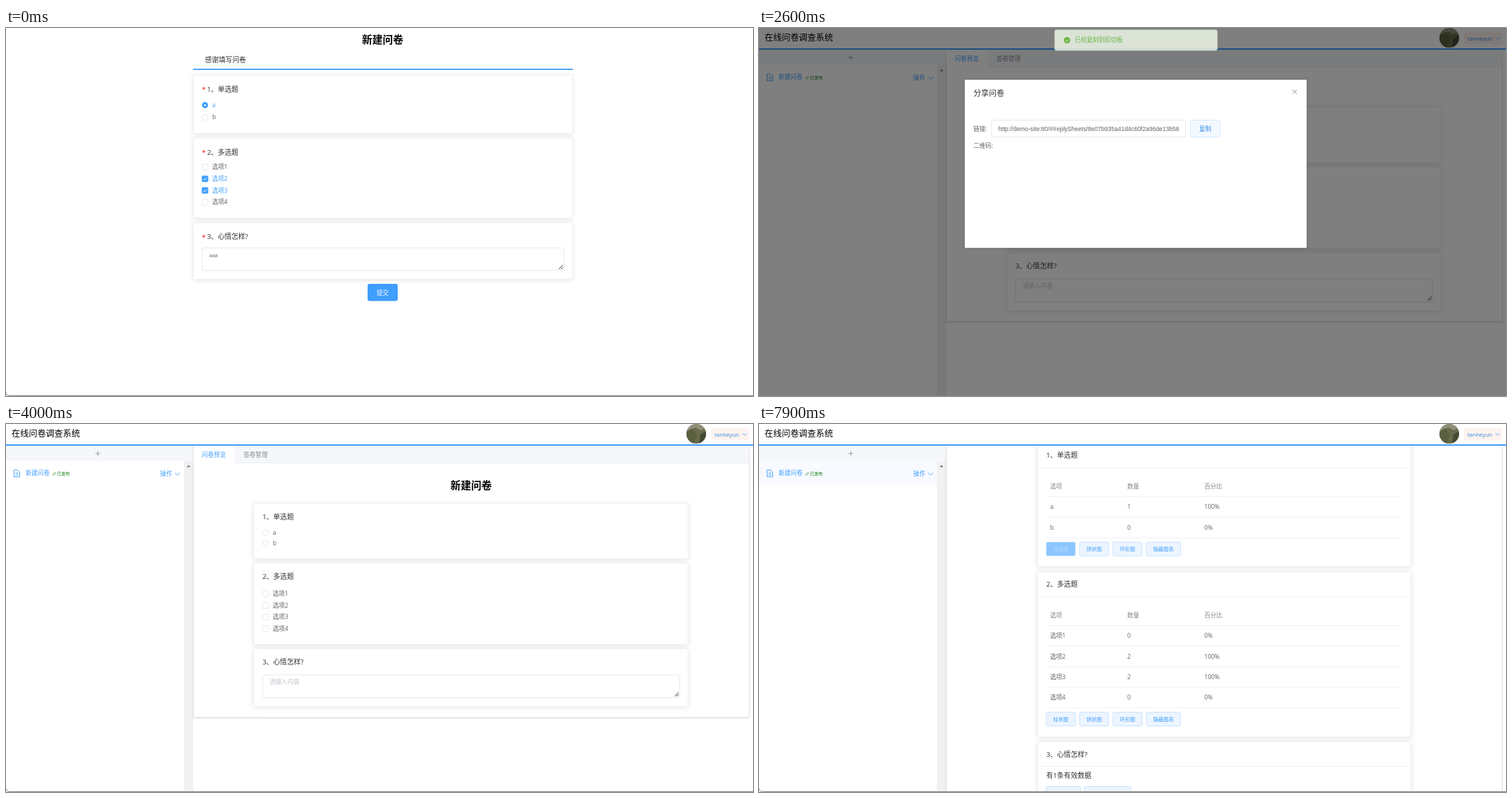
Animation of 1066x525 px, one loop 8000 ms. Source, as an HTML page:

```html
<!DOCTYPE html>
<html lang="zh-CN">
<head>
<meta charset="utf-8">
<title>问卷</title>
<style>
html, body { margin: 0; width: 100%; height: 100%; overflow: hidden; background: #fff; }
svg { display: block; }
text { font-family: 'Open Sans', 'Noto Sans CJK SC', 'Noto Sans CJK', sans-serif; white-space: pre; }
.card { filter: drop-shadow(0 1.2px 3.6px rgba(0,0,0,.11)); }
.panel { filter: drop-shadow(0 1.2px 1.2px rgba(0,0,0,.14)); }
.dialog { filter: drop-shadow(0 .6px 1.5px rgba(0,0,0,.35)); }
#url { font-family: 'Liberation Sans', Arial, sans-serif; }
</style>
</head>
<body>
<svg id="stage" width="1066" height="525" viewBox="0 0 1066 525"></svg>
<script>
const BLUE = '#409eff', DEEP = '#2f86dc', GREY = '#606266', DARK = '#303133', PALE = '#84878d',
  LINE = '#dcdfe6', GREEN = '#67c23a';
const SMALL = 8.55, MEDIUM = 9.78, LARGE = 14.7;

// Shape helpers; text is placed by the vertical centre of its glyphs.
const rect = (x, y, w, h, fill, more = '') =>
  `<rect x="${x}" y="${y}" width="${w}" height="${h}" fill="${fill}" ${more}/>`;
const text = (x, y, s, size = SMALL, fill = GREY, more = '') =>
  `<text x="${x}" y="${y + size * .37}" font-size="${size}" fill="${fill}" ${more}>${s}</text>`;
const middle = (x, y, s, size, fill, more = '') =>
  text(x, y, s, size, fill, `text-anchor="middle" ${more}`);
const bold = (x, y, s, fill = '#000') => middle(x, y, s, LARGE, fill, 'font-weight="700"');
const path = (d, stroke, w = .8, more = '') =>
  `<path d="${d}" fill="none" stroke="${stroke}" stroke-width="${w}" ${more}/>`;
const disc = (x, y, r, fill, more = '') => `<circle cx="${x}" cy="${y}" r="${r}" fill="${fill}" ${more}/>`;
const group = (id, body, more = '') => `<g id="${id}" ${more}>${body}</g>`;
const edge = (color, r = 2.4) => `rx="${r}" stroke="${color}" stroke-width=".7"`;
const card = (x, y, w, h) => rect(x, y, w, h, '#fff', edge('#ebeef5') + ' class="card"');
const chevron = (x, y, w) => path(`M${x} ${y}l${w / 2} ${w / 2.2}l${w / 2} ${-w / 2.2}`, BLUE, .8);
const tick = (x, y, s) => path(`M${x - s} ${y}l${s * .8} ${s * .8}l${s * 1.3} ${-s * 1.5}`, '#fff', .9);

const radio = (x, y, label, on) =>
  (on ? disc(x, y, 4.4, BLUE) + disc(x, y, 1.3, '#fff')
      : disc(x, y, 4.1, '#fff', `stroke="${LINE}" stroke-width=".7"`)) +
  text(x + 10.2, y - .4, label, SMALL, on ? BLUE : GREY);
const checkbox = (x, y, label, on) =>
  rect(x - 4.2, y - 4.2, 8.4, 8.4, on ? BLUE : '#fff', edge(on ? BLUE : LINE, 1.2)) +
  (on ? tick(x, y, 2.3) : '') + text(x + 10.2, y - .2, label, SMALL, on ? BLUE : GREY);
const textarea = (x, y, w, h) => rect(x, y, w, h, '#fff', edge(LINE)) +
  path(`M${x + w - 7} ${y + h - 2}l5.5 -5.5M${x + w - 4} ${y + h - 2}l2.5 -2.5`, '#333', 1);
const button = (x, y, w, label, id = '') => group(id,
  rect(x, y, w, 19.5, '#ecf5ff', edge('#b3d8ff', 1.8)) + middle(x + w / 2, y + 9.7, label, 7.33, BLUE));
const question = (x, y, s) => text(x, y, s, MEDIUM, DARK);
const required = (x, y, s) => text(x, y + .4, '*', MEDIUM, '#f00') + question(x + 7.4, y, s);
const options = (x, y, chosen) => [1, 2, 3, 4].map((n, i) =>
  checkbox(x, y + i * 16.6, '选项' + n, chosen.includes(n))).join('');

const form = rect(0, 0, 1066, 525, '#fff') + bold(537.5, 17, '新建问卷') +
  text(284, 45, '感谢填写问卷', MEDIUM, DARK) + rect(267, 58, 542, 1.8, BLUE) +
  card(267.2, 67.5, 541, 83) + required(279.5, 87, '1、单选题') +
  radio(284, 110, 'a', true) + radio(284, 127.5, 'b') +
  card(267.2, 157, 541, 114) + required(279.5, 177, '2、多选题') + options(284, 198.5, [2, 3]) +
  card(267.2, 278, 541, 80.5) + required(279.5, 297.5, '3、心情怎样?') +
  textarea(280, 313.8, 516, 32.2) + text(290, 324, 'aaa', 7.3) +
  rect(516, 365, 43, 24.5, BLUE, 'id="submit" rx="2.4"') + middle(537.5, 377.4, '提交', SMALL, '#fff');

const loading = rect(0, 0, 1066, 525, '#fff', 'id="veil"') +
  path('M533 250.3a12.2 12.2 0 1 1 -12.2 12.2', BLUE, 1.2, 'id="spinner" stroke-linecap="round"');

const done = rect(0, 0, 1066, 525, '#fff') + card(263.5, 7, 536, 175.5) +
  disc(531.7, 75, 48.8, '#35b36f') +
  '<path d="M507 77.5L512 72.5L525 82L557 57L560 60.5L524 95.5Z" fill="#fff"/>' +
  bold(531.2, 149, '填写问卷成功', DARK);

const message = (id, x, s) => group(id, rect(x, 0, 232, 29.3, '#f0f9eb', edge('#e1f3d8')) +
  disc(x + 17.6, 14.8, 4.5, GREEN) + tick(x + 17.6, 15, 2.1) + text(x + 28.6, 14.6, s, SMALL, GREEN));

const avatar = '<clipPath id="round"><circle cx="985" cy="14" r="14"/></clipPath><g clip-path="url(#round)">' +
  rect(971, 0, 28, 28, '#6a6a4c') + '<path d="M971 0h28v5l-8 4l-7 -4l-13 5z" fill="#8f8f7a"/>' +
  '<path d="M971 12l8 -6l7 9l-4 13h-11z" fill="#59603f"/><path d="M999 10l-8 5l-2 13h10z" fill="#454a34"/></g>';

const sidebar = rect(0, 31, 267, 21.5, '#f5f7fa') + path('M127.5 42h7M131 38.5v7', PALE, .8) +
  rect(0, 52.5, 254, 34, '#fff', 'id="row"') +
  path('M11.5 65.7h5l3 3v6.6h-8zM13.5 70h4M13.5 72.5h4', BLUE, .9) +
  text(28, 70.3, '新建问卷', SMALL, BLUE) +
  path('M66 73l3 -3.5a1 1 0 0 1 1.5 1.3l-2.8 2.8', '#3a8a3a', .7) +
  text(72.8, 71.2, '已发布', 6.1, '#0a7a0a') +
  text(220, 70.6, '操作', SMALL, BLUE) + chevron(241, 69.7, 7.5) +
  rect(254, 52.5, 13, 472, '#f1f1f1') + '<path d="M257.8 61.5l2.7 -3l2.7 3z" fill="#777"/>';

const header = rect(0, 0, 1066, 30, '#fff') + text(8, 13.6, '在线问卷调查系统', 12.22, '#000') + avatar +
  rect(1006, 6, 54, 17, '#fdf3f0', 'rx="2.4"') +
  text(1011, 14.6, 'tanheyun', 8, DEEP) + chevron(1051, 13.5, 6) + rect(0, 29, 1066, 2, BLUE);

const tabs = (active, height) =>
  rect(267.4, 31, 793, height, '#fff', `stroke="${LINE}" stroke-width=".7" class="panel"`) +
  rect(267.4, 31, 793, 24.5, '#f5f7fa', 'stroke="#e4e7ed" stroke-width=".7"') +
  rect(active ? 327 : 267.7, 31, 59, 25, '#fff') +
  text(279.5, 43.8, '问卷预览', SMALL, active ? PALE : BLUE) +
  text(339, 43.8, '答卷管理', SMALL, active ? BLUE : PALE, active ? '' : 'id="tab"');

const preview = tabs(0, 387.5) + bold(663.7, 87.3, '新建问卷') +
  card(353.7, 113, 619.5, 79.3) + question(366, 132.6, '1、单选题') +
  radio(370.5, 155.3, 'a') + radio(370.5, 169.9, 'b') +
  card(353.7, 198.5, 619.5, 116) + question(366, 217.5, '2、多选题') + options(370.5, 242.2, []) +
  card(353.7, 320.7, 619.5, 82.3) + question(366, 339.5, '3、心情怎样?') +
  textarea(366.2, 358, 595, 32.5) + text(376, 367.8, '请输入内容', SMALL, '#c0c4cc');

const rule = (y, x = 410, w = 507.5) => rect(x, y - .4, w, .8, '#ebeef5');
function statCard(y, title, rows, id) {
  const cells = (cy, values, fill) => values.map((v, i) => text(415.5 + i * 110, cy, v, SMALL, fill)).join('');
  const end = y + 77 + rows.length * 29.3;
  return card(397.7, y, 532.5, end + 41 - y) + question(410, y + 17.7, title) + rule(y + 35.2, 398, 532) +
    cells(y + 62, ['选项', '数量', '百分比'], PALE) + rule(y + 76.7) +
    rows.map((r, i) => cells(y + 91.2 + i * 29.3, r, GREY) + rule(y + 106 + i * 29.3)).join('') +
    ['柱状图', '饼状图', '环形图', '隐藏图表'].map((s, i) =>
      button(410 + i * 47.6, end + 6, i < 3 ? 41.3 : 48.8, s, i ? '' : id)).join('');
}
const stats = tabs(1, 700) + button(398, 77, 51, '导出数据') +
  statCard(104, '1、单选题', [['a', 1, '100%'], ['b', 0, '0%']], 'bar') +
  statCard(288, '2、多选题', [['选项1', 0, '0%'], ['选项2', 2, '100%'], ['选项3', 2, '100%'], ['选项4', 0, '0%']], 'bar2') +
  card(397.7, 530.3, 532.5, 140) + question(410, 548, '3、心情怎样?') + rule(565.5, 398, 532) +
  question(410, 578.6, '有1条有效数据') + button(410, 594.3, 48.8, '查看详情') + button(464.5, 594.3, 66.5, '显示全部内容');

const dialog = rect(293.6, 73.8, 488, 240, '#fff', 'rx="1.2" class="dialog"') +
  text(306, 93.4, '分享问卷', 11, DARK) + path('M761.5 88l6 6m0 -6l-6 6', PALE, .9, 'id="close"') +
  text(306, 143.4, '链接:') + rect(332, 131.5, 277, 24, '#fff', edge(LINE)) +
  '<clipPath id="field"><rect x="340" y="132" width="260" height="23"/></clipPath><g clip-path="url(#field)">' +
  text(341.5, 143.4, 'http://demo-site:80/#/replySheets/8e07b935a41d4c60f2a96de13b58', SMALL, GREY, 'id="url"') + '</g>' +
  rect(615.5, 131.5, 42.5, 24, '#f3f9ff', edge('#c6e2ff') + ' id="copy"') +
  middle(636.8, 143.4, '复制', SMALL, DEEP, 'id="copyLabel"') + text(306, 167.9, '二维码:');

const stage = document.getElementById('stage');
stage.innerHTML = group('form', form) + group('loading', loading) + group('done', done) +
  message('saved', 415.5, '回答问卷成功') +
  group('app', rect(0, 0, 1066, 525, '#fff') + sidebar + group('preview', preview) +
    group('stats', stats) + header) +
  rect(0, 0, 1066, 525, '#000', 'id="mask"') + group('dialog', dialog) +
  message('copied', 422, '已经复制到剪切板') +
  path('M0 519.5q.3 4.8 4.5 5H1066', '#858585', 1);

const $ = id => document.getElementById(id);
const set = (id, attrs) => { for (const k in attrs) $(id).setAttribute(k, attrs[k]); };
const show = (id, on) => set(id, { display: on ? 'inline' : 'none' });
// Value of the last [time, value] pair reached.
const at = (t, ...steps) => steps.reduce((v, [time, next]) => t >= time ? next : v, steps[0][1]);
const slide = (id, y, opacity) => set(id, { transform: `translate(0 ${y})`, opacity });

function draw(now) {
  const t = Math.floor(now % 8000 / 100) * 100;
  const inApp = t >= 2600, inStats = t >= 7000;

  show('form', t < 1400);
  set('submit', { fill: at(t, [0, BLUE], [300, '#66b1ff']) });
  show('loading', t >= 1000 && t < 1400);
  set('veil', { opacity: at(t, [0, .3], [1100, .7], [1200, .9]) });
  set('spinner', { transform: `rotate(${t * .36} 533 262.5)` });
  show('done', t >= 1400 && !inApp);
  show('saved', t >= 1400 && !inApp);
  slide('saved', at(t, [0, -20], [1500, -6], [1600, 3], [1700, 6.6]), at(t, [0, .3], [1500, .65], [1600, .9], [1700, 1]));

  show('app', inApp);
  show('preview', !inStats);
  show('stats', inStats);
  set('tab', { fill: at(t, [0, PALE], [5100, '#6293c6'], [5200, BLUE], [5300, PALE], [6900, BLUE]) });
  set('row', { fill: at(t, [0, '#fff'], [5500, '#f5faff'], [5600, '#ecf5ff'], [6900, '#f8faff']) });
  const scroll = at(t, [0, 0], [7600, 4], [7700, 29], [7800, 66], [7900, 77]);
  set('stats', { transform: `translate(0 ${-scroll})` });
  const [face, label] = $('bar').children;
  face.setAttribute('fill', at(t, [0, '#ecf5ff'], [7900, '#8cc5ff']));
  label.setAttribute('fill', at(t, [0, BLUE], [7900, '#b4d9ff']));

  const open = inApp && t < 4000;
  show('mask', open);
  set('mask', { opacity: at(t, [0, .5], [3800, .465], [3900, .2]) });
  show('dialog', open);
  slide('dialog', at(t, [0, 0], [3800, -.5], [3900, -11]), at(t, [0, 1], [3800, .95], [3900, .45]));
  set('close', { stroke: at(t, [0, PALE], [3500, BLUE]) });
  const focused = t < 3700;
  set('copy', { fill: focused ? '#f3f9ff' : '#fff', stroke: focused ? '#c6e2ff' : LINE });
  set('copyLabel', { fill: focused ? DEEP : GREY });
  show('copied', inApp && t < 3800);
  slide('copied', at(t, [0, 2.7], [2700, 9], [2800, 12.2], [3700, 0]), at(t, [0, .82], [2700, .95], [2800, 1], [3700, .5]));
}

function loop() {
  draw(performance.now());
  requestAnimationFrame(loop);
}
loop();
</script>
</body>
</html>
```
